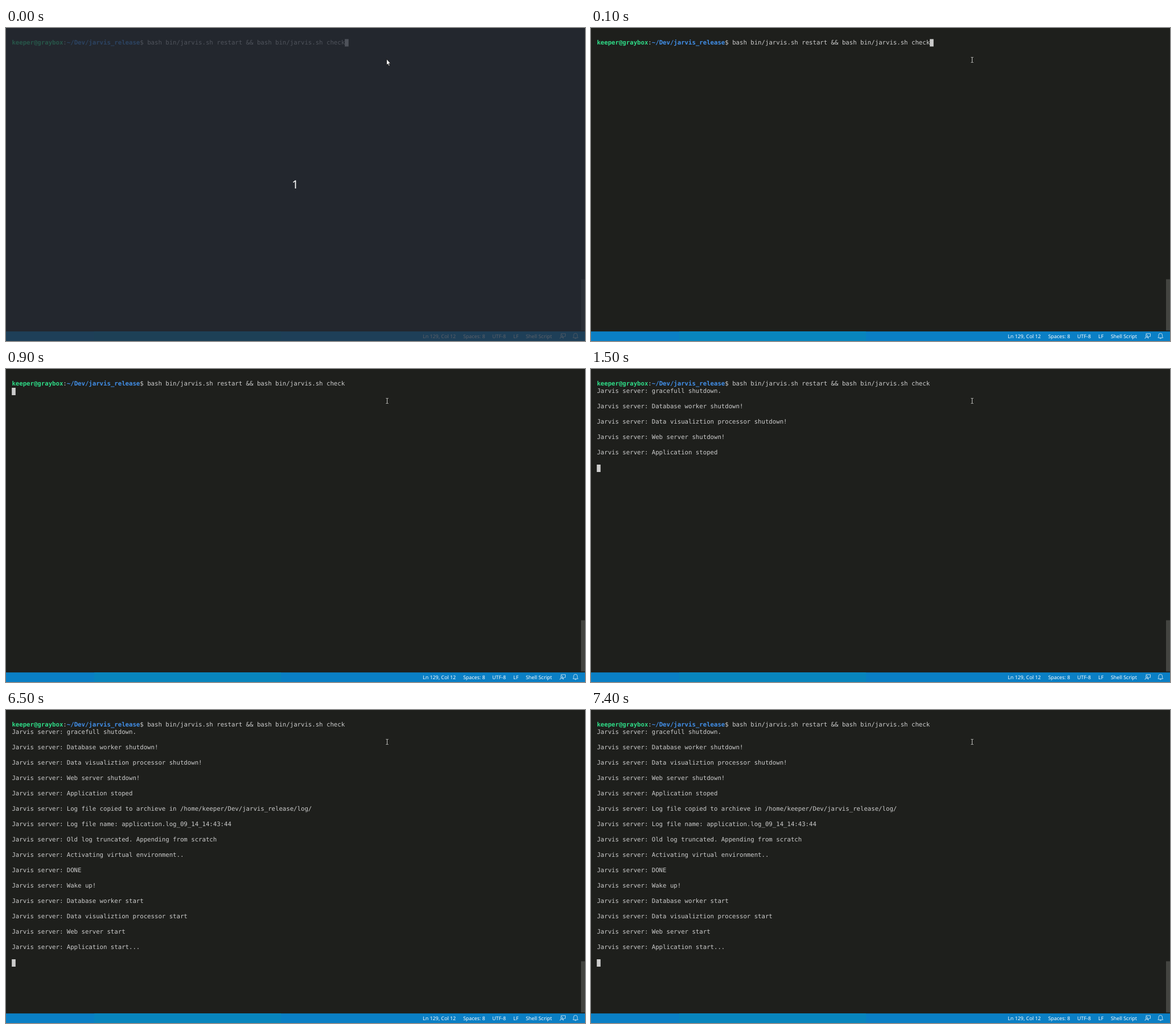
Recreate the animation shown at these times as an HTML page. Size 1017 by 550 pixels, loop 8 s.

```html
<!DOCTYPE html>
<html lang="en">
<head>
<meta charset="utf-8">
<title>Terminal restart</title>
<style>
  html, body { margin: 0; width: 100%; height: 100%; overflow: hidden; background: #1e1f1c; }
  svg { display: block; }
  text { white-space: pre; text-rendering: geometricPrecision; }
  #term { font: 10.68px "DejaVu Sans Mono", monospace; fill: #cccccc; }
  #term .user { font-weight: bold; fill: #2fdd88; }
  #term .path { font-weight: bold; fill: #4290ea; }
  #status, #count { font: 8.9px "Noto Sans", sans-serif; fill: #fff; }
  #status path { fill: none; stroke: #e4f1f9; stroke-width: .8; }
  #count { font-size: 20px; }
</style>
</head>
<body>
<svg width="1017" height="550" viewBox="0 0 1017 550">
  <rect width="1017" height="550" fill="#1e1f1c"/>
  <g id="term">
    <text x="10.4" y="29"><tspan class="user">keeper@graybox</tspan>:<tspan class="path">~/Dev/jarvis_release</tspan>$ bash bin/jarvis.sh restart &amp;&amp; bash bin/jarvis.sh check</text>
    <rect id="caret" width="6.6" height="13"/>
  </g>
  <rect x="1010" y="441.5" width="7" height="90" fill="#434440"/>
  <g id="status">
    <rect y="533.2" width="1017" height="17" fill="#0a7fc5"/>
    <rect x="155" y="533.2" width="328" height="17" fill="#0885bd"/>
    <text x="732" y="544.7">Ln 129, Col 12</text>
    <text x="803" y="544.7">Spaces: 8</text>
    <text x="854" y="544.7">UTF-8</text>
    <text x="891" y="544.7">LF</text>
    <text x="913" y="544.7">Shell Script</text>
    <path d="M975 539v-2h7.5v5h-2l-2 2v-2M973 546q0-3 3-3t3 3M974.4 541a1.6 1.6 0 1 0 3.2 0a1.6 1.6 0 1 0-3.2 0"/>
    <path d="M996 544.3h8.6l-1-2v-2.5a3.3 3.3 0 0 0-6.6 0v2.5zM999 544.6a1.3 1.3 0 0 0 2.6 0"/>
  </g>
  <path id="beam" d="M667.5 51.5h1.5l.5.5l.5-.5h1.5M669.5 52v8M667.5 60.5h1.5l.5-.5l.5.5h1.5" fill="none" stroke="#d8d8d5" stroke-width=".9"/>
  <g id="countdown">
    <rect width="1017" height="550" fill="#252a34" opacity=".75"/>
    <text id="count" x="508" y="282" text-anchor="middle">1</text>
    <path d="M668.5 54.5v10.6l2.3-2.1l1.7 3.8l1.7-.8l-1.7-3.6h3.1z" fill="#fff" stroke="#111" stroke-width=".8"/>
  </g>
</svg>
<script>
const LOOP = 8000, ROW = 13.5, DIM = 100, ENTER = 900, STOPPED = 1500, STARTED = 6500;
const $ = id => document.getElementById(id);
const show = (el, on) => el.setAttribute("visibility", on ? "visible" : "hidden");

const stopping = [
  "gracefull shutdown.",
  "Database worker shutdown!",
  "Data visualiztion processor shutdown!",
  "Web server shutdown!",
  "Application stoped"
];
const starting = [
  "Log file copied to archieve in /home/keeper/Dev/jarvis_release/log/",
  "Log file name: application.log_09_14_14:43:44",
  "Old log truncated. Appending from scratch",
  "Activating virtual environment..",
  "DONE",
  "Wake up!",
  "Database worker start",
  "Data visualiztion processor start",
  "Web server start",
  "Application start..."
];

const lines = [...stopping, ...starting].map((message, i) => {
  const el = document.createElementNS("http://www.w3.org/2000/svg", "text");
  el.setAttribute("x", 10.4);
  el.setAttribute("y", 42.2 + 2 * ROW * i);
  el.textContent = "Jarvis server: " + message;
  $("term").append(el);
  return el;
});

function draw(t) {
  const printed = t < STOPPED ? 0 : t < STARTED ? stopping.length : lines.length;
  lines.forEach((el, i) => show(el, i < printed));
  const typing = t < ENTER;
  $("caret").setAttribute("x", typing ? 595.1 : 10.2);
  $("caret").setAttribute("y", 19.5 + (typing ? 0 : ROW * (1 + 2 * printed)));
  show($("countdown"), t < DIM);
  show($("beam"), t >= DIM);
}

const start = performance.now();
function tick() {
  draw((performance.now() - start) % LOOP);
  requestAnimationFrame(tick);
}
tick();
</script>
</body>
</html>
```
